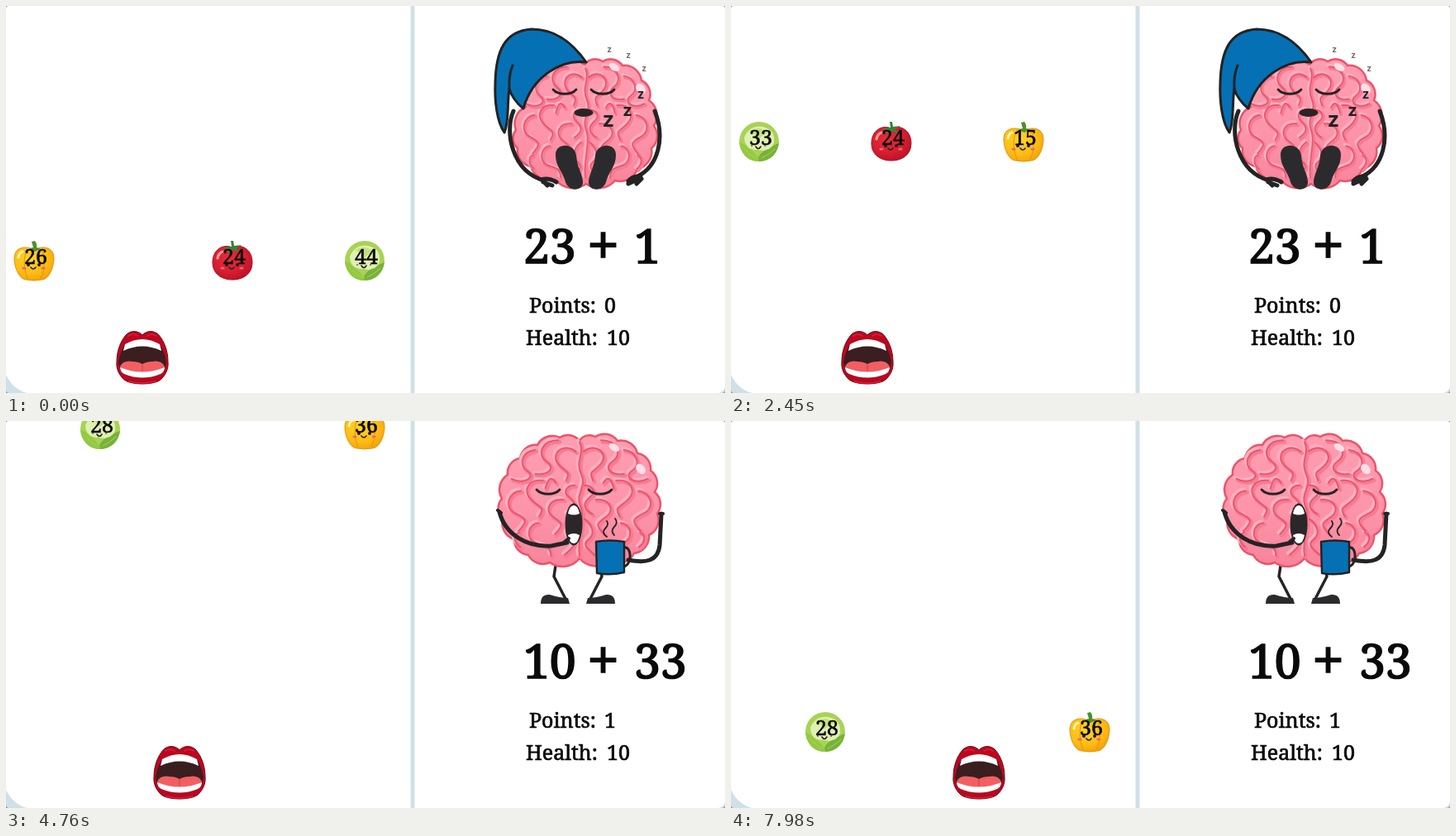
Animation of 870x468 px, one loop 8 s. Source, as an HTML page:

```html
<!DOCTYPE html>
<html lang="en">
<head>
<meta charset="utf-8">
<title>Feed the brain</title>
<style>
  html, body { margin: 0; width: 100%; height: 100%; overflow: hidden; background: #fff; }
  svg { display: block; width: 870px; height: 468px; }
  text { font-family: "Noto Serif", serif; font-weight: 500; fill: #0a0a0a; }
  .sum { font-size: 57px; stroke: #0a0a0a; stroke-width: 1.7; }
  .plus { font-size: 70px; }
  .stat { font-size: 25px; stroke: #0a0a0a; stroke-width: .7; }
  .tag { font-size: 25px; stroke: #0a0a0a; stroke-width: .6; text-anchor: middle; }
  .zed { font-family: Inter, sans-serif; font-weight: 700; fill: #222; text-anchor: middle; }
  .line { fill: none; stroke: #242425; stroke-linecap: round; stroke-linejoin: round; }
  .fold { fill: none; stroke-linecap: round; }
</style>
</head>
<body>
<svg viewBox="0 0 870 468">
  <defs>
    <radialGradient id="yellow" cx=".4" cy=".35" r=".7">
      <stop offset="0" stop-color="#ffd42b"/><stop offset=".65" stop-color="#fdbb12"/><stop offset="1" stop-color="#f2a00e"/>
    </radialGradient>
    <radialGradient id="red" cx=".4" cy=".35" r=".7">
      <stop offset="0" stop-color="#e62c3a"/><stop offset=".6" stop-color="#d71e30"/><stop offset="1" stop-color="#b81129"/>
    </radialGradient>
    <linearGradient id="pink" x2="0" y2="1">
      <stop offset="0" stop-color="#ff9db1"/><stop offset=".55" stop-color="#fd95aa"/><stop offset="1" stop-color="#f8849a"/>
    </linearGradient>

    <g id="face">
      <path class="line" stroke-width="1.6" d="M-4 8q3 4 6 0"/>
      <g fill="#f4607a"><ellipse cx="-12" cy="9" rx="2.6" ry="1.6"/><ellipse cx="11" cy="9" rx="2.6" ry="1.6"/></g>
      <g fill="#2a1718"><circle cx="-7" cy="5" r="2"/><circle cx="6" cy="5" r="2"/></g>
    </g>

    <g id="pepper">
      <path fill="url(#yellow)" stroke="#dd9512" d="M0-13C8-18 24-18 24-3C24 8 18 23 9 23Q0 25-9 23C-18 23-24 8-24-3C-24-18-8-18 0-13Z"/>
      <path class="fold" stroke="#e59b0d" stroke-width="1.2" d="M-8-14C-14-4-12 12-8 21M9-14C14-4 13 12 8 21"/>
      <path class="fold" stroke="#fff3a8" stroke-width="3" d="M-19-4Q-18-10-14-11"/>
      <path fill="#4d8f2e" d="M-8-12Q-4-16-1-16L-3-23L1-24Q4-20 3-16Q8-15 9-12Q4-14 1-11Q-4-14-8-12Z"/>
      <use href="#face"/>
    </g>
    <g id="tomato">
      <path fill="url(#red)" stroke="#a51227" d="M0-16C12-21 24-13 24 2C24 16 13 23 0 23S-24 16-24 2C-24-13-12-21 0-16Z"/>
      <path class="fold" stroke="#ff9a9a" stroke-width="3" d="M-18-3Q-17-9-12-11"/>
      <path fill="#398138" d="M-1-17L-2-24H1L2-18L11-19L5-15L9-10L1-13L-5-8L-5-14L-13-16Z"/>
      <use href="#face"/>
    </g>
    <g id="cabbage">
      <circle r="24" fill="#a8d354"/>
      <path fill="#e0efb2" d="M-18-5Q-12-20 4-18Q20-15 18 2Q12 14-1 10Q-17 11-18-5Z"/>
      <path fill="#c3e07c" d="M-12-13Q0-20 11-11Q4-8-1-3Q-5-10-12-13Z"/>
      <path fill="#93c943" d="M-24 1Q-18 2-13 8Q-4 13 0 24Q-20 24-24 1Z"/>
      <path fill="#78b23a" d="M24 2Q17 4 12 9Q4 10-1 19L0 24Q20 23 24 2Z"/>
      <path class="fold" stroke="#a8d354" d="M3 20Q12 16 19 9M-19 8Q-12 15-4 20"/>
      <path class="line" stroke-width="1.6" d="M-4 6q3 5 6 0M-9 5h.2M7 5h.2"/>
    </g>

    <g id="mouth">
      <path fill="#bd0620" stroke="#6b0d18" d="M0-28C5-34 15-34 20-28C27-20 31-8 31 4C32 13 28 20 23 25C16 33-16 33-23 25C-28 20-32 13-31 4C-31-8-27-20-20-28C-15-34-5-34 0-28Z"/>
      <path class="fold" stroke="#d5203a" stroke-width="1.6" d="M-17-27Q-11-31-6-27M17-27Q11-31 6-27M-16 28Q0 32 16 28"/>
      <path fill="#3b1e20" d="M-21-17Q0-27 21-17Q27-7 29 5Q27 16 22 19Q0 29-22 19Q-27 16-29 5Q-27-7-21-17Z"/>
      <path fill="#fff" d="M-21-17Q0-29 21-17L23-9Q0-20-23-9Z"/>
      <path fill="#f15f63" d="M-27 10Q-23 2-12 4Q-5 4 0 7Q5 4 12 4Q23 2 27 10Q23 20 0 21Q-23 20-27 10Z"/>
      <path class="fold" stroke="#d5434e" stroke-width="1.2" d="M0 8V15"/>
      <path fill="#fff" d="M-27 11Q0 22 27 11Q27 16 22 19Q0 28-22 19Q-27 16-27 11Z"/>
    </g>

    <!-- one half of the brain's folds, mirrored below -->
    <g id="half" class="fold">
      <path d="M5 36C20 24 36 38 28 50S10 58 17 72"/>
      <path d="M27 22C48 22 54 40 42 48S38 66 56 64"/>
      <path d="M56 34C72 36 78 52 66 60S70 78 86 70"/>
      <path d="M46 72C64 70 72 84 62 95S42 104 51 117"/>
      <path d="M74 85C90 86 96 106 81 113S65 123 77 135"/>
      <path d="M20 96C38 94 45 109 34 117S18 126 31 139"/>
      <path d="M52 125C65 126 69 145 55 150S37 153 36 166"/>
      <path d="M6 78C16 78 22 86 13 93S4 107 16 114"/>
      <path d="M6 120C17 128 20 139 11 146S12 158 19 165"/>
      <path d="M76 137C83 139 84 148 75 155M30 75Q38 62 43 82"/>
    </g>
    <g id="folds">
      <use href="#half"/><use href="#half" transform="scale(-1 1)"/>
      <path class="fold" d="M0 24C7 38-6 48 2 64S-6 88 1 104S-4 148 0 166"/>
    </g>
    <g id="wrinkles">
      <use href="#folds" x="-2" y="-2" stroke="#ffb0c0" stroke-width="4"/>
      <use href="#folds" x="2" y="2" stroke="#f67c93" stroke-width="4.5"/>
      <use href="#folds" stroke="#e8566e" stroke-width="2"/>
    </g>
    <g id="shine" fill="#ffe0e6">
      <ellipse cx="736" cy="32" rx="7" ry="4" transform="rotate(30 736 32)"/>
      <ellipse cx="768" cy="58" rx="5" ry="7" transform="rotate(-40 768 58)"/>
    </g>
    <path id="eyelid" class="line" stroke-width="2.8" d="M-14-2C-8 5 8 5 14-2"/>
    <path id="shoe" fill="#2b2b2d" d="M665 180C665 165 688 165 690 181C691 195 698 204 698 213C698 224 681 225 677 213C674 200 665 195 665 180Z"/>
    <g id="leg">
      <path class="line" stroke-width="3.5" d="M665 175L663 188L677 215"/>
      <path fill="#2b2b2d" d="M647 221Q647 209 658 210Q670 214 680 214L682 221Z"/>
    </g>
  </defs>

  <path fill="#cfe0e7" d="M489.5 0h5v468h-5zM0 446Q8 463 25 468H0ZM870 461V468H862Q868 467 870 461Z"/>
  <path fill="#87949b" d="M0 0h3Q0 0 0 3ZM870 0v3Q870 0 867 0ZM0 468v-4Q0 468 4 468ZM870 468h-4Q870 468 870 464Z"/>

  <g id="asleep">
    <path class="blob" data-points="617,150 629,122 642,94 670,73 700,71 722,67 746,72 769,90 778,114 784,145 781,172 764,197 737,211 702,215 665,210 635,194 619,172"/>
    <use href="#wrinkles" transform="translate(701 53) scale(.83 .93)"/>
    <use href="#shine" y="42"/>
    <path fill="#0670b4" stroke="#222" stroke-width="3" stroke-linejoin="round" d="M603 153C594 140 591 115 592 92C593 55 603 30 636 28C668 28 688 48 702 68C672 64 637 85 626 124C618 118 611 108 609 100C606 120 609 140 603 153Z"/>
    <path class="line" stroke-width="3" d="M609 100Q608 84 613 72"/>
    <use href="#eyelid" x="676" y="103"/><use href="#eyelid" x="722" y="103"/>
    <ellipse cx="699" cy="129" rx="11.5" ry="5" fill="#2b2425"/>
    <path class="line" stroke-width="5" d="M614 127C603 152 612 200 651 211M785 127C798 160 789 194 764 206"/>
    <path class="line" stroke-width="5" d="M648 210Q656 207 666 213M650 213L661 217M652 214L655 217M768 206Q758 205 753 212M768 208L753 215M769 209L763 215"/>
    <use href="#shoe"/><use href="#shoe" transform="translate(1403) scale(-1 1)"/>
    <text class="zed" x="729" y="146" font-size="25">z</text>
    <text class="zed" x="752" y="133" font-size="20">z</text>
    <text class="zed" x="768" y="112" font-size="15">z</text>
    <g opacity=".65">
      <text class="zed" x="730" y="56" font-size="10">z</text>
      <text class="zed" x="753" y="63" font-size="10">z</text>
      <text class="zed" x="772" y="79" font-size="10">z</text>
    </g>
  </g>

  <g id="awake">
    <use href="#leg"/><use href="#leg" transform="translate(1384) scale(-1 1)"/>
    <path class="blob" data-points="694,24 713,19 740,24 764,39 780,60 785,86 788,112 778,138 760,160 730,170 694,166 658,171 632,162 615,143 601,118 600,94 607,65 622,45 643,29 670,20"/>
    <use href="#wrinkles" transform="translate(694 2) scale(.96 .97)"/>
    <use href="#shine"/>
    <use href="#eyelid" x="656" y="85"/><use href="#eyelid" x="719" y="85"/>
    <ellipse cx="687" cy="125" rx="10.5" ry="25.5" fill="#2b2728"/>
    <path fill="#fff" d="M680 112Q682 102 687 102T694 112Q687 115 680 112ZM680 138Q687 134 694 138Q692 148 687 148T680 138Z"/>
    <path class="line" stroke-width="5" d="M597 110C604 137 630 153 660 151L679 147M793 112L791 150C789 170 774 172 753 168"/>
    <path class="line" stroke-width="4" d="M595 108L599 111M791 112L795 112M676 146L681 142"/>
    <path class="line" stroke-width="1.8" d="M727 140Q720 135 725 130T727 121M736 138Q731 133 736 128T737 118"/>
    <path class="line" stroke-width="3" d="M748 153C757 151 758 173 748 176"/>
    <path fill="#0670b4" stroke="#222" stroke-width="2.4" stroke-linejoin="round" d="M714 146Q731 143 748 146V183Q731 187 715 184Z"/>
  </g>

  <text class="sum" y="311"><tspan id="left" x="626">23</tspan><tspan class="plus" x="703" y="314">+</tspan><tspan id="right" x="760" y="311">1</tspan></text>
  <text class="stat" y="371"><tspan x="633">Points:</tspan><tspan id="points" x="724">0</tspan></text>
  <text class="stat" y="410"><tspan x="629">Health:</tspan><tspan x="727">10</tspan></text>
  <g id="food"></g>
  <use id="player" href="#mouth"/>
</svg>

<script>
const $ = id => document.getElementById(id);
const LOOP = 8000, TICK = 70, EATEN = 60;

// Each wave: vegetables [kind, x, number] and heights [tick, y]
const waves = [
  { items: [['pepper', 34, 26], ['tomato', 274, 24], ['cabbage', 434, 44]],
    heights: [[0, 308], [13, 412]] },
  { items: [['cabbage', 34, 33], ['tomato', 194, 24], ['pepper', 354, 15]],
    heights: [[13, -8], [14, 0], [35, 164], [59, 358], [66, 414]] },
  { items: [['cabbage', 114, 28], ['pepper', 434, 36]],
    heights: [[66, -6], [79, 98], [96, 234], [115, 384]] }
];
// Ticks at which the mouth takes one 15px step to the right
const steps = [42, 54, 68, 76, 87, 93, 100, 106, 111];

// Bumpy closed outline: an outward arc between neighbouring points
function blobPath(points) {
  const arcs = points.map(([x, y], i) => {
    const [nx, ny] = points[(i + 1) % points.length];
    const r = Math.hypot(nx - x, ny - y) * .72;
    return `A${r} ${r} 0 0 1 ${nx} ${ny}`;
  });
  return `M${points[0]}${arcs.join('')}Z`;
}

for (const blob of document.querySelectorAll('.blob')) {
  const points = blob.dataset.points.split(' ').map(p => p.split(',').map(Number));
  blob.setAttribute('d', blobPath(points));
  blob.setAttribute('fill', 'url(#pink)');
  blob.setAttribute('stroke', '#ec5368');
  blob.setAttribute('stroke-width', 2.5);
}

$('food').innerHTML = waves.map(({ items }) => `<g>${items.map(([kind, x, n]) =>
  `<g transform="translate(${x})"><use href="#${kind}"/><text class="tag" x="2" y="3.5">${n}</text></g>`
).join('')}</g>`).join('');
const groups = [...$('food').children];
const snack = groups[1].children[1];

function heightAt(keys, tick) {
  const i = Math.max(1, keys.findIndex(([t]) => t >= tick));
  const [t0, y0] = keys[i - 1], [t1, y1] = keys[i];
  return 2 * Math.round((y0 + (y1 - y0) * (tick - t0) / (t1 - t0)) / 2);
}

const show = (node, on) => { node.style.display = on ? '' : 'none'; };

function draw() {
  const tick = Math.floor(performance.now() % LOOP / TICK);
  const fed = tick >= EATEN;

  waves.forEach(({ heights }, i) => {
    const active = tick >= heights[0][0] && tick < heights.at(-1)[0];
    show(groups[i], active);
    if (active) groups[i].setAttribute('transform', `translate(0 ${heightAt(heights, tick)})`);
  });
  show(snack, !fed);
  show($('asleep'), !fed);
  show($('awake'), fed);

  $('left').textContent = fed ? 10 : 23;
  $('right').textContent = fed ? 33 : 1;
  $('points').textContent = fed ? 1 : 0;

  const x = 165 + 15 * steps.filter(t => tick >= t).length;
  $('player').setAttribute('transform', `translate(${x} 426)`);
  requestAnimationFrame(draw);
}
draw();
</script>
</body>
</html>
```
